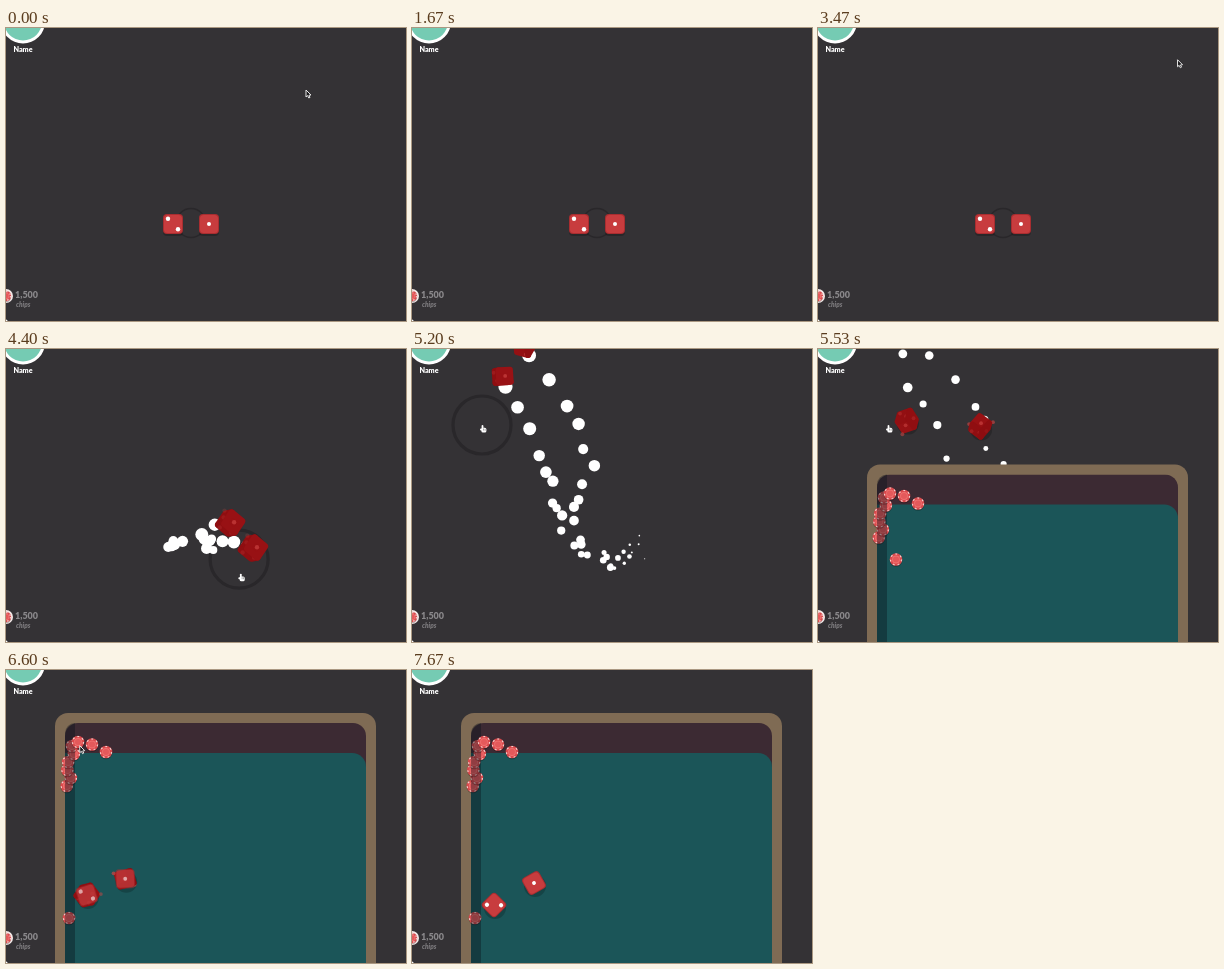
An HTML page with a canvas for the animation above (7.74 s loop, 400 px wide and 293 px high).

```html
<!DOCTYPE html>
<html lang="en">
<head>
<meta charset="utf-8">
<title>Dice roll</title>
<style>
html, body { margin: 0; width: 100%; height: 100%; overflow: hidden; background: #343235; }
canvas { display: block; }
</style>
</head>
<body>
<canvas id="stage" width="400" height="293"></canvas>
<script>
const c = document.getElementById('stage').getContext('2d');
const LOOP = 7740, RELOAD = 2000, POP = 2750, ENTER = 3330, GRAB = 4070, DRAG = 4240;
const THROWN = 5290, SETTLE = 6500, DUST_STEP = 36;

const ramp = (t, a, b) => Math.max(0, Math.min(1, (t - a) / (b - a)));
const smooth = p => p * p * (3 - 2 * p);
const easeOut = p => 1 - (1 - p) ** 2;
const easeBack = p => 1 + 1.6 * (p - 1) ** 3 + .6 * (p - 1) ** 2;
const mix = (a, b, p) => a.map((v, i) => v + (b[i] - v) * p);
const rnd = n => { const s = Math.sin(n * 12.9898) * 43758.5453; return s - Math.floor(s); };

// Spline through points reached at equal time steps
const spline = (start, step, points) => t => {
  const last = points.length - 1, s = ramp(t, start, start + step * last) * last;
  const i = Math.min(last - 1, Math.floor(s)), u = s - i;
  const at = k => points[Math.max(0, Math.min(last, k))];
  return [0, 1].map(d => {
    const [a, b, e, f] = [-1, 0, 1, 2].map(k => at(i + k)[d]);
    return b + u / 2 * (e - a + u * (2 * a - 5 * b + 4 * e - f + u * (3 * (b - e) + f - a)));
  });
};

const drag = points => spline(DRAG, 160, points);
const bounce = points => spline(5190, 370, points);
const dice = [
  {
    pips: 2, home: [167, 196], rest: -Math.PI / 4,
    toss: drag([[167, 196], [224, 174], [225, 196], [185, 208], [162, 168], [176, 102], [113, -3], [40, -110]]),
    land: bounce([[100, -80], [88, 82], [80, 161], [80, 205], [81, 228], [82, 235]])
  },
  {
    pips: 1, home: [203, 196], rest: -Math.PI / 6,
    toss: drag([[203, 196], [247, 199], [218, 210], [194, 214], [152, 172], [134, 122], [91, 28], [40, -90]]),
    land: bounce([[178, -80], [160, 88], [121, 163], [116, 199], [120, 210], [122, 213]])
  }
];
const ringAt = drag([[185, 195], [233, 210], [226, 236], [196, 228], [166, 190], [128, 122], [70, 76]]);

function disc(x, y, r, fill) {
  c.fillStyle = fill;
  c.beginPath();
  c.arc(x, y, r, 0, 7);
  c.fill();
}

function box(x, y, w, h, radii, fill) {
  c.fillStyle = fill;
  c.beginPath();
  c.roundRect(x, y, w, h, radii);
  c.fill();
}

function label(text, x, y, font, fill, align = 'left') {
  c.font = font + ' Lato, sans-serif';
  c.fillStyle = fill;
  c.textAlign = align;
  c.fillText(text, x, y);
}

function chip(x, y, r = 6.3) {
  disc(x, y + 1, r, 'rgba(0,0,0,.25)');
  disc(x, y, r, '#d94a4d');
  c.strokeStyle = '#f3cfcd';
  c.lineWidth = 1.2;
  c.setLineDash([r * .3, r * .48]);
  c.beginPath();
  c.arc(x, y, r - .8, 0, 7);
  c.stroke();
  c.setLineDash([]);
  disc(x, y, r * .62, '#f0706f');
  disc(x, y, r * .48, '#e4595b');
}

function flatDie(die, [x, y], angle, scale) {
  c.save();
  c.translate(x, y);
  c.scale(scale, scale);
  if (!angle) box(-10, -8, 20, 20, 4, 'rgba(0,0,0,.22)');
  c.rotate(angle);
  box(-10, -10, 20, 20, 4, '#a92d30');
  box(-9, -9, 18, 18, 3.5, '#c83c3e');
  if (die.pips === 1) disc(0, 0, 2, '#fff');
  else for (const s of [-1, 1]) disc(s * 5, s * 5.3, 2.2, '#fff');
  c.restore();
}

function cube([x, y], t, seed, scale) {
  const age = (t - 4400) / 1000;
  const spins = [.35 + age * (6 + seed), .3 + age * (4.5 - seed), .7 + age];
  const turn = p => {
    spins.forEach((a, i) => {
      const j = (i + 1) % 3, k = (i + 2) % 3, s = Math.sin(a), o = Math.cos(a);
      [p[j], p[k]] = [p[j] * o - p[k] * s, p[j] * s + p[k] * o];
    });
    return p;
  };
  c.save();
  c.translate(x, y);
  c.scale(scale, scale);
  c.lineJoin = 'round';
  c.lineWidth = 6;
  for (let axis = 0; axis < 3; axis++) for (const side of [-1, 1]) {
    const at = (u, v) => {
      const p = [];
      p[axis] = side * 6; p[(axis + 1) % 3] = u * 6; p[(axis + 2) % 3] = v * 6;
      return turn(p);
    };
    const depth = at(0, 0)[2] / 6;
    if (depth <= 0) continue;
    c.fillStyle = c.strokeStyle = `rgb(${138 + depth * 16},${12 + depth * 6},${15 + depth * 6})`;
    c.beginPath();
    for (const [u, v] of [[-1, -1], [1, -1], [1, 1], [-1, 1]]) c.lineTo(...at(u, v).slice(0, 2));
    c.closePath();
    c.fill();
    c.stroke();
    const count = 3 - axis;
    for (let k = 0; k < count; k++) {
      const s = (k - (count - 1) / 2) * 1.1, p = at(s, s);
      disc(p[0] * 1.3, p[1] * 1.3, 1.9, `rgba(205,70,68,${depth * .7})`);
    }
  }
  c.restore();
}

function dust(t, path, from, to, life, seed) {
  for (let k = 0, born = from; born <= Math.min(t, to); k++, born = from + k * DUST_STEP) {
    const age = (t - born) / life;
    if (age >= 1) continue;
    const n = seed + k * 3, [x, y] = path(born);
    const dir = rnd(n) * 6.283, drift = 1 + 12 * age ** .6 * rnd(n + 1);
    disc(x + Math.cos(dir) * drift, y + Math.sin(dir) * drift,
      7.2 * (1 - .5 * rnd(n + 2) * Math.sqrt(age)) * (1 - age) ** .6, '#fff');
  }
}

function hud(loaded) {
  disc(17, -6.5, 22, '#fff');
  disc(17, -6.5, 19, '#75cbb3');
  disc(0, 268, 7, '#f4e9e8');
  chip(0, 268, 5.2);
  disc(0, 293, 1.6, '#fff');
  if (!loaded) return;
  label('Name', 17, 23.5, '900 7.2px', '#fff', 'center');
  label('1,500', 9, 270, '900 9px', '#8a888b');
  label('chips', 10, 278.5, 'italic 900 6.5px', '#7b797c');
}

function ring(t) {
  const grow = smooth(ramp(t, GRAB, 4250));
  c.globalAlpha = 1 - ramp(t, 5300, 5480);
  c.strokeStyle = '#29272a';
  c.lineWidth = 1.3 + 1.9 * grow;
  c.beginPath();
  c.arc(...ringAt(t), 14.5 + 14.5 * grow, 0, 7);
  c.stroke();
  c.globalAlpha = 1;
}

function table(t) {
  const y = 300 - 257 * easeBack(ramp(t, THROWN, 6143));
  box(49, y, 321, 400, 13, '#7f6b54');
  c.save();
  c.beginPath();
  c.roundRect(59, y + 10, 301, 400, 13);
  c.clip();
  box(59, y + 10, 301, 400, 0, '#3c2a33');
  box(59, y + 40, 301, 400, [0, 14, 0, 0], '#1b5558');
  c.restore();
  const [x, dy] = mix([78, 95], [63, 205], easeOut(ramp(t, 5700, 6600)));
  chip(x, y + dy);
  for (let i = 5; i >= 0; i--) chip(66 - i + 3 * Math.sin(i * 1.9), y + 33 + i * 8);
  box(59, y + 10, 10, 400, [13, 0, 0, 0], 'rgba(8,16,24,.38)');
  for (let i = 0; i < 3; i++) chip(72 + i * 14, y + 29 + i * i * 2.5);
}

function arrow(x, y) {
  c.beginPath();
  for (const [dx, dy] of [[0, 0], [0, 7], [1.6, 5.6], [2.8, 8], [4, 7.4], [2.9, 5.2], [5, 5]])
    c.lineTo(x + dx, y + dy);
  c.closePath();
  c.lineWidth = 1;
  c.fillStyle = '#1b1a1c';
  c.strokeStyle = '#e6e6e6';
  c.fill();
  c.stroke();
}

function hand(x, y) {
  box(x - .4, y, 1.8, 6, .9, '#fff');
  box(x - .6, y + 2.8, 5, 4.8, 1.6, '#fff');
  box(x - 2, y + 3.6, 2.4, 2, 1, '#fff');
  box(x + 1.5, y + 3.5, .5, 2, 0, '#555');
  box(x + 2.8, y + 3.7, .5, 2, 0, '#555');
}

function pointer(t) {
  const glide = (a, b, from, to) => arrow(...mix(a, b, smooth(ramp(t, from, to))));
  if (t < 770) glide([300, 62], [225, -14], 70, 760);
  else if (t < ENTER) return;
  else if (t < 3950) glide([386, 7], [185, 195], ENTER, 3950);
  else if (t < 6560) hand(...ringAt(t + 80));
  else if (t < 7260) glide([70, 76], [388, 50], 6560, 7200);
}

function draw(now) {
  const t = now % LOOP;
  c.fillStyle = '#343235';
  c.fillRect(0, 0, 400, 293);

  const pop = t < RELOAD ? 1 : smooth(ramp(t, POP, POP + 230));
  const lift = 1.15 - .15 * ramp(t, 4700, 5150);
  const settled = ramp(t, SETTLE, SETTLE + 180);
  const wobble = .5 * (1 - smooth(ramp(t, SETTLE, 7500)));

  if (pop && t < 5500) ring(t);
  dice.forEach((d, i) => dust(t, d.toss, GRAB, THROWN, 720, 11 + i * 300));
  if (t >= THROWN) {
    table(t);
    dice.forEach((d, i) => dust(t, d.land, 5570, 6100, 430, 700 + i * 300));
  }
  dice.forEach((d, i) => {
    if (t < GRAB) {
      if (pop) flatDie(d, d.home, 0, pop);
    } else if (t < THROWN) {
      cube(d.toss(t), t, i, lift);
    } else {
      const [x, y] = d.land(t);
      disc(x + 1, y + 3, 11, 'rgba(0,0,0,.2)');
      if (settled < 1) cube([x, y], t, i, 1);
      c.globalAlpha = settled;
      flatDie(d, [x, y], d.rest + wobble, .97);
      c.globalAlpha = 1;
    }
  });

  hud(t < RELOAD || t > 2620);
  pointer(t);
  requestAnimationFrame(draw);
}
requestAnimationFrame(draw);
</script>
</body>
</html>
```
